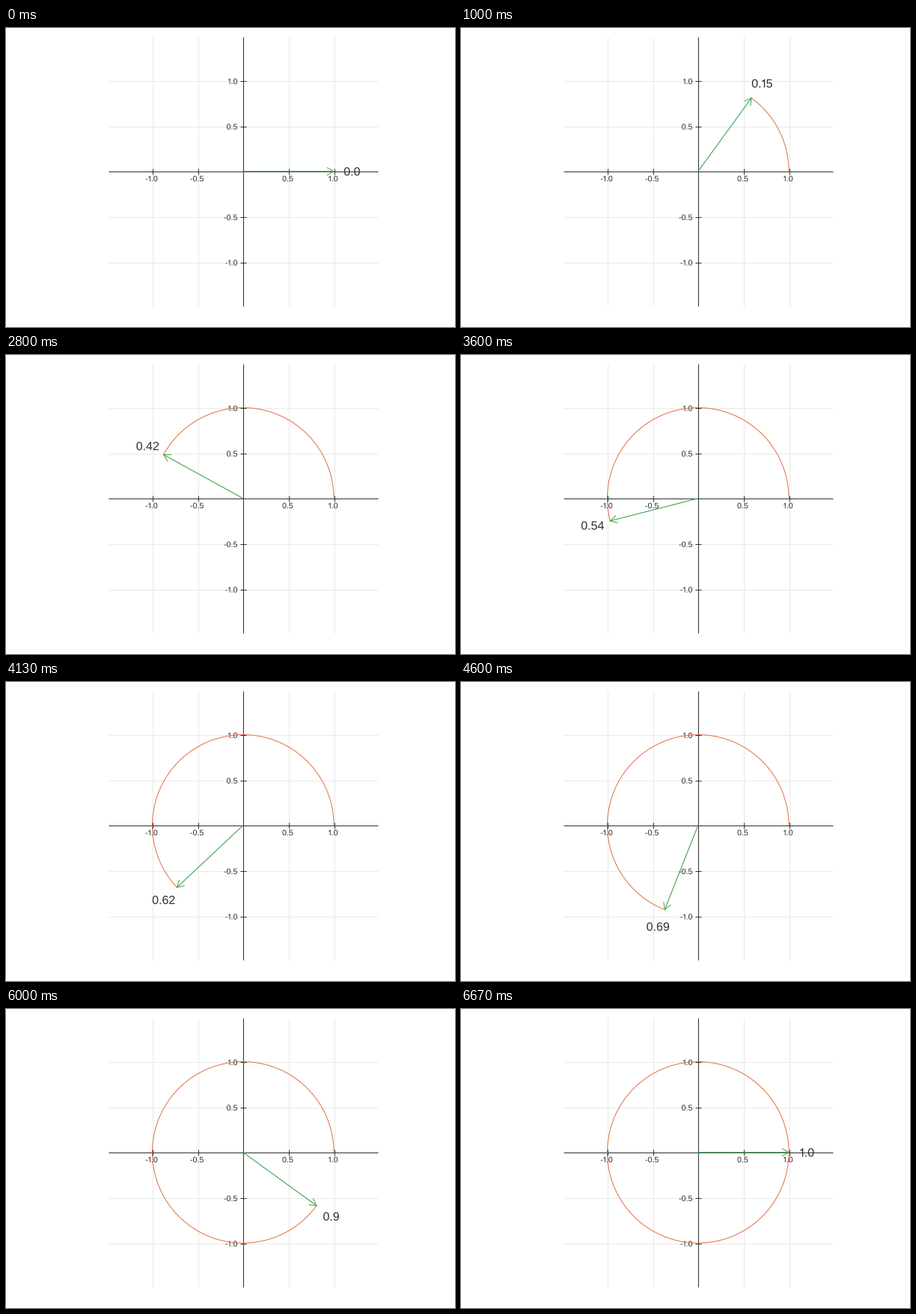
Animation, 600 px wide and 400 px high, one loop 6740 ms. Source, as a matplotlib script:

```python
import math

import numpy as np
import matplotlib.pyplot as plt
from matplotlib.animation import FuncAnimation
from matplotlib.patches import PathPatch
from matplotlib.path import Path
from matplotlib.textpath import TextPath
from matplotlib.transforms import Affine2D

W, H, DPI = 600, 400, 100
CX, CY, UNIT = 316.8, 191.8, 121.3
LOOP, INTERVAL = 6740, 20
STEPS = 100

INK, GRID = "#303030", "#e8e8e8"
ORANGE, GREEN = "#e26f46", "#3da44d"
PX = 72 / DPI

fig = plt.figure(figsize=(W / DPI, H / DPI), dpi=DPI, facecolor="white")
ax = fig.add_axes([0, 0, 1, 1])
ax.set_xlim(0, W)
ax.set_ylim(H, 0)
ax.axis("off")


# Advance widths in em; the digit one is narrow and has no foot.
ADVANCE = {".": 0.278, "-": 0.333, "1": 0.38}
ONE = Path([(.29, 0), (.29, .7), (.225, .7), (.18, .61), (.04, .565),
            (.04, .505), (.205, .505), (.205, 0), (.29, 0)], closed=True)
GLYPHS = {"1": ONE}
for ch in "-.023456789":
    GLYPHS[ch] = TextPath((0, 0), ch, size=1, prop={"family": "Liberation Sans"})


def label_path(text, x, y, size, align=0.5):
    """Outline of text, vertically centred on y; align 0.5 centre, 1 right."""
    parts, pen = [], 0
    for ch in text:
        parts.append(GLYPHS[ch].transformed(Affine2D().translate(pen, 0)))
        pen += ADVANCE.get(ch, 0.556)
    place = (Affine2D().translate(-pen * align, -0.35)
             .scale(size, -size).translate(x, y))
    return Path.make_compound_path(*parts).transformed(place)


def add_label(path, z):
    return ax.add_patch(PathPatch(path, facecolor=INK, lw=0, zorder=z))


def crisp(xs, ys, color, z):
    ax.plot(xs, ys, color=color, lw=PX, zorder=z, snap=True,
            solid_capstyle="butt")


def mid(v):
    return math.floor(v) + 0.5


def polar(turn, r=1.0):
    a = 2 * math.pi * turn
    return CX + UNIT * r * math.cos(a), CY - UNIT * r * math.sin(a)


for v in (-1.0, -0.5, 0.5, 1.0):
    gx, gy = mid(CX + v * UNIT), mid(CY - v * UNIT)
    crisp([gx, gx], [12, 372], GRID, 1)
    crisp([137, 497], [gy, gy], GRID, 1)
    crisp([gx, gx], [188, 196], INK, 2)
    crisp([313, 321], [gy, gy], INK, 2)
    add_label(label_path(str(v), CX + v * UNIT - 1, 201.4, 10.67), 3)
    add_label(label_path(str(v), 309.4, CY - v * UNIT + 0.8, 10.67, 1), 3)
crisp([137, 497], [mid(CY)] * 2, INK, 2)
crisp([mid(CX)] * 2, [12, 372], INK, 2)

arc, = ax.plot([], [], color=ORANGE, lw=PX, zorder=4)
shaft, = ax.plot([], [], color=GREEN, lw=1.1 * PX, zorder=5, snap=False)
head, = ax.plot([], [], color=GREEN, lw=PX, zorder=5, snap=False,
                solid_joinstyle="miter")
value = add_label(label_path("0.0", *polar(0, 1.2), 16), 6)


def update(k):
    t = k * INTERVAL + INTERVAL / 2
    step = min(STEPS, int((t + 5) * 0.015))
    turn = step / STEPS

    a = 2 * np.pi * np.arange(step + 1) / STEPS
    arc.set_data(CX + UNIT * np.cos(a), CY - UNIT * np.sin(a))

    tx, ty = polar(turn)
    shaft.set_data([CX, tx], [CY, ty])
    ux, uy = (tx - CX) / UNIT, (ty - CY) / UNIT
    back, half = 8.8, 4.9
    bx, by = tx - back * ux, ty - back * uy
    head.set_data([bx - half * uy, tx, bx + half * uy],
                  [by + half * ux, ty, by - half * ux])

    value.set_path(label_path(str(turn), *polar(turn, 1.2), 16))
    return arc, shaft, head, value


anim = FuncAnimation(fig, update, frames=LOOP // INTERVAL, interval=INTERVAL,
                     repeat=True, repeat_delay=0)
plt.show()
```
